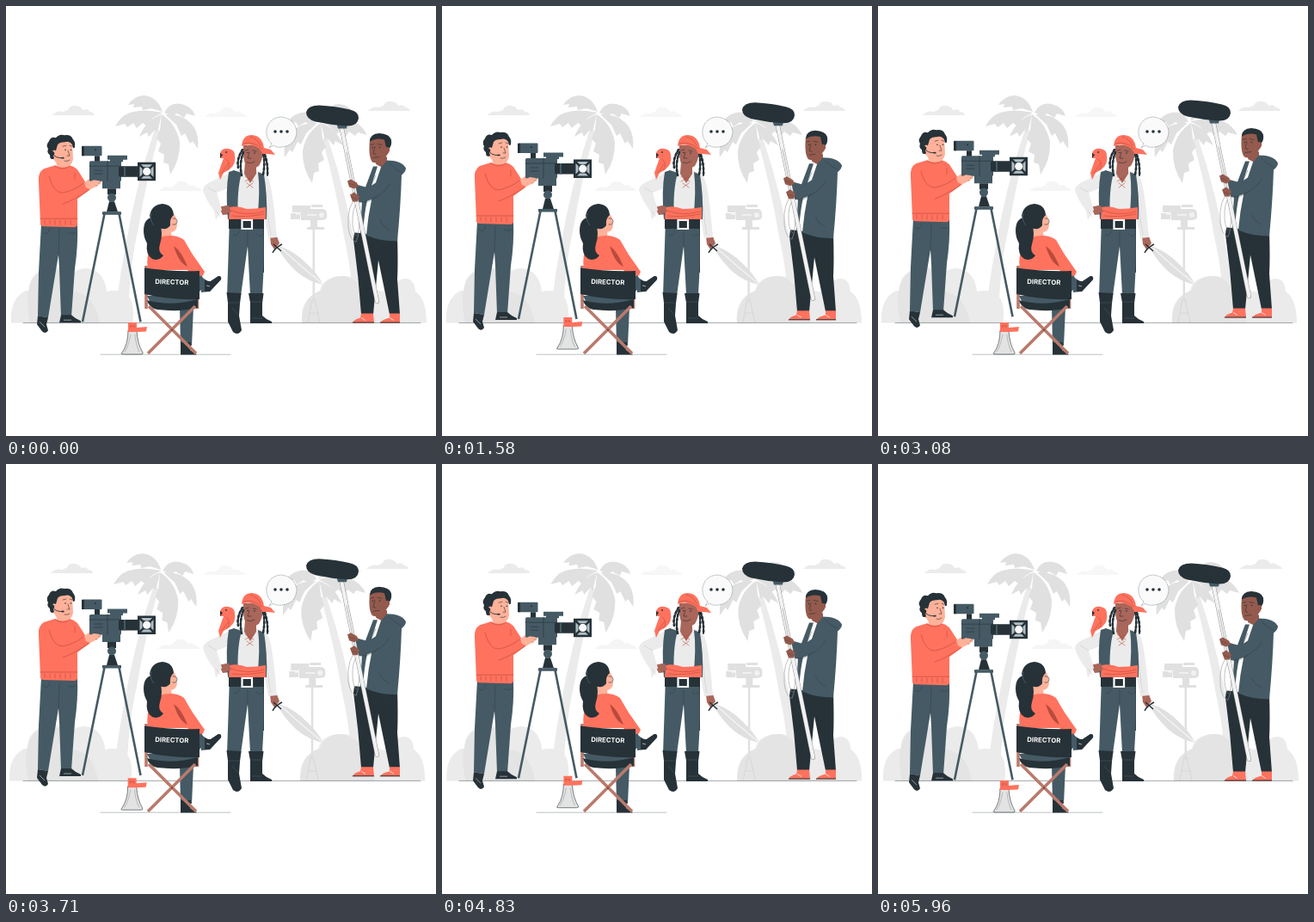
Recreate the animation shown at these times as an HTML page. Size 500 by 500 pixels, loop 6000 ms.

```html
<!DOCTYPE html>
<html lang="en">
<head>
<meta charset="utf-8">
<title>On set</title>
<style>
html, body { margin: 0; width: 100%; height: 100%; overflow: hidden; background: #fff; }
svg { display: block; width: 100vw; height: 100vh; }
.coral { fill: #ff725e; } .dark { fill: #263238; } .slate { fill: #455a64; }
.light { fill: #ffb199; } .tan { fill: #a9665a; } .brown { fill: #945a4d; }
.pale { fill: #ebebeb; } .grey { fill: #e0e0e0; } .white { fill: #fff; }
.ink { fill: none; stroke: #263238; stroke-width: .6; stroke-linecap: round; stroke-linejoin: round; }
.seam { fill: none; stroke: #b94b3c; stroke-width: .6; stroke-linecap: round; }
.fold { fill: none; stroke: #263238; stroke-width: .5; opacity: .7; }
.wood { fill: none; stroke: #b97a6c; stroke-width: 3.6; }
</style>
</head>
<body>
<svg viewBox="0 0 500 500">
  <defs>
    <path id="cloud" d="M0 12Q5 6 13 8Q16 6 18 6Q20 0 28 1Q34 2 35 6Q42 4 43 8Q48 8 49 12Z"/>
    <clipPath id="sky"><path d="M-10 0H510V368.5H-10Z"/></clipPath>
    <g id="palm">
      <path class="pale" d="M173 143Q150 212 138 285Q130 325 127 368H142Q143 305 154 258Q163 203 179 145Z"/>
      <g class="grey">
        <path d="M182 123Q176 105 160 104Q148 105 142 115L149 114L148 118L158 117L159 121L169 119Z"/>
        <path d="M182 124Q160 119 144 124Q133 128 127 140L138 137L141 141L148 136L152 142L159 136L163 139L171 130Z"/>
        <path d="M181 126Q163 132 155 152L164 147L166 152L173 144L176 147Z"/>
        <path d="M184 124Q190 111 204 114Q217 117 220 128L210 125L207 130L199 125L194 128Z"/>
        <path d="M185 126Q207 125 218 140Q225 151 223 166L217 157L214 160L208 148L204 151L198 138Z"/>
        <path d="M181 126Q198 137 202 158Q203 178 191 196L189 184L183 182L184 173L177 169L180 160L175 154L179 144Z"/>
      </g>
    </g>
  </defs>

  <g id="backdrop" clip-path="url(#sky)">
    <use href="#cloud" x="54" y="115" class="pale"/>
    <use href="#cloud" x="231" y="117" fill="#f7f7f7"/>
    <use href="#cloud" x="178" y="203" fill="#f5f5f5"/>
    <use href="#cloud" x="421" y="110" class="pale"/>
    <use href="#palm"/>
    <g transform="translate(547 10) scale(-1 1)"><use href="#palm"/></g>
    <path class="pale" d="M6 369Q4 340 23 331H27Q26 310 50 304Q66 302 76 311Q94 299 108 311Q116 319 117 332Q142 327 147 347Q149 358 147 369Z"/>
    <path class="grey" opacity=".6" d="M28 369Q21 335 30 319Q42 300 65 308Q78 315 77 332Q103 333 109 369Z"/>
    <path class="pale" d="M344 369Q341 341 365 331Q369 314 392 314Q410 314 417 328L450 334Q451 318 464 317Q475 317 476 332Q489 340 489 369Z"/>
    <path class="grey" opacity=".6" d="M344 369Q344 338 366 331Q373 314 392 314Q413 317 416 339Q430 347 430 369Z"/>
    <g class="grey">
      <path d="M333 232H354V237H342V240H333ZM342 236H369Q373 237 373 241V246Q372 249 366 249H343ZM331 241H342V248H331ZM355 231H368V234H355ZM354 249H362V257H354ZM350 257H370V260H350ZM356.5 260H359V345H356.5Z"/>
      <path d="M351 368L356 341H359L365 368M353 357H364" fill="none" stroke="#d7d7d7"/>
    </g>
    <path d="M337 242H342M350 243H361" fill="none" stroke="#fff"/>
    <circle cx="367" cy="243" r="3" fill="#f2f2f2"/>
  </g>

  <path class="ink" stroke-opacity=".7" d="M20 368.4H482"/>
  <path class="ink" stroke-opacity=".5" d="M110 405.2H261"/>

  <g id="cameraman">
    <path class="slate" d="M41 254H83Q84 280 80 306L76 362H64L62 306L61 290L49 363L37 361L38 310Z"/>
    <path class="fold" d="M62 260L61 291M43 264Q49 269 51 259M72 264Q78 267 82 263"/>
    <path class="dark" d="M37 361L49 363L47 371L49 378Q46 383 42 379L36 371ZM64 360H76Q80 364 87 367V369H62Z"/>
    <path d="M39 368L45 374M67 366H76" stroke="#fff" stroke-width=".5"/>
    <path class="light" d="M57 173L59 187Q64 194 74 188L73 178Z"/>
    <path class="coral" d="M57 186L44 190Q37 194 38 205L40 254Q40 257 44 257L80 258Q84 257 83 252V225L98 214L92 205L83 191Q79 187 74 186Q66 191 57 186Z"/>
    <path class="seam" d="M40 248H83M50 199Q55 218 66 218Q80 215 90 207M66 231Q78 227 96 215M57 187Q66 193 74 187M45 250V254M51 250V254M57 250V255M63 250V255M69 250V255M75 250V255M80 195V202"/>
    <path class="light" d="M91 206L98 201L110 202L111 206L106 210L98 214L93 212Z"/>
    <path class="ink" stroke-opacity=".5" d="M100 204L109 207M100 208L106 210"/>
    <path class="light" d="M54 160Q64 153 77 158L78 179Q76 188 69 188Q60 187 56 180Q50 176 54 168Z"/>
    <path class="dark" d="M56 178Q51 181 51 174Q47 171 49 167Q46 162 50 158Q52 152 58 154Q62 149 68 151Q76 150 78 156Q81 159 80 165Q78 168 77 162Q74 157 68 159Q62 159 60 162L58 169Q54 167 54 171Z"/>
    <path class="ink" d="M66 164L70 163M74 163L77 164M72 169L74 175L71 175M68 181Q71 182 74 180"/>
    <circle cx="69" cy="168" r=".8" class="dark"/><circle cx="75.5" cy="168" r=".8" class="dark"/>
    <path d="M54 172Q57 178 66 177.5" fill="none" stroke="#263238" stroke-width=".9"/>
    <circle cx="54" cy="172" r="2.3" class="dark"/><ellipse cx="66" cy="177.5" rx="1.8" ry=".9" class="dark"/>

    <path d="M115 240L89 368M131 240L156.5 368" fill="none" stroke="#455a64" stroke-width="2.6"/>
    <path class="slate" d="M112 203H133V213H112ZM112 240H134V243.5H112Z"/>
    <path class="dark" d="M118 213H128V220H118ZM120 228H126L130 240H117Z"/>
    <circle cx="123" cy="223.5" r="5" class="slate"/>
    <path class="dark" d="M103 175H109V182H103Z"/>
    <rect class="slate" x="88" y="163.5" width="23.5" height="11.5" rx="1"/>
    <path class="dark" d="M88 164H91V175H88Z"/>
    <circle cx="104" cy="168" r="1" class="dark"/>
    <path class="slate" d="M118 174.5H141V179.5H136V182H121V179.5H118Z"/>
    <rect class="slate" x="97" y="181" width="37" height="23.5" rx="1.5"/>
    <path class="ink" d="M97 187H133M118 181V204M103 192H112M103 196H112"/>
    <rect class="dark" x="131" y="187" width="24" height="12.5" rx="2"/>
    <path class="slate" d="M137 187H139V199.5H137Z"/>
    <path class="dark" d="M153 182.5H174V204H153Z"/>
    <path fill="#b0bec5" d="M157 185H170L167 188H160ZM157 201.5H170L167 198.5H160ZM155.5 187L158.5 190V196.5L155.5 199.5ZM171.5 187L168.5 190V196.5L171.5 199.5Z"/>
    <circle cx="163.7" cy="193.2" r="4.6" fill="#fafafa"/>
    <path class="light" d="M94 207L102 203L109 204L105 209L97 213Z"/>
  </g>

  <g id="megaphone">
    <path d="M142 378H152Q153 393 159 403Q160 405 157 405H136Q133 405 135 403Q142 393 142 378Z" class="ink" style="fill:#e3e3e3"/>
    <path class="coral" d="M142 368H152V374L164 373L163 378.5L152 379H142Z"/>
    <path class="seam" d="M144 372H149M145 374V372M149 374V372"/>
    <path class="ink" stroke-opacity=".4" d="M145 382Q143 394 138 402M150 382Q151 394 155 402"/>
  </g>

  <g id="director">
    <path class="light" d="M179 256L191 255L193 270H177Z"/>
    <path class="light" d="M185 238Q196 238 198 248L199 255Q198 264 189 263L184 256Z"/>
    <path class="coral" d="M178 269Q196 264 207 272Q211 279 217 289L231 309Q228 318 219 318L211 307H165Q162 288 171 275Z"/>
    <path d="M195 279Q204 285 211 303Q201 299 195 279Z" fill="#b94b3c"/>
    <path class="dark" d="M167 244Q169 231 182 230Q194 231 195 243Q190 247 191 255Q188 260 182 259Q176 259 172 254Z"/>
    <path class="dark" d="M173 245Q160 246 160 261Q160 269 164 276Q162 289 170 294Q178 297 183 290Q176 286 179 277Q183 265 179 254Z"/>
    <path d="M169 241Q166 248 172 255" fill="none" stroke="#455a64"/>
    <path class="ink" d="M194 247Q199 246 199 251Q198 255 194 254"/>
    <path class="slate" d="M202 350H218L216 395H203Z"/>
    <path class="dark" d="M203 391H215L214 400Q219 403 222 405.5H203Z"/>
    <path class="slate" d="M207 315L228 314L230 327L220 337H208Z"/>
    <path class="slate" d="M226 313Q233 321 238 320L247 314Q251 314 250 318L237 332L227 333Z"/>
    <path class="dark" d="M231 318Q235 321 238 320L247 314Q251 314 250 318L237 332L231 332Z"/>
    <path d="M233 325L237 326" stroke="#fff" stroke-width=".6"/>
    <path d="M163 302V352M222.5 314V352" class="wood"/>
    <path class="slate" d="M164 337H222V349Q216 354 194 354Q170 353 164 337Z"/>
    <path class="dark" d="M164 342Q192 350 223 341V351Q202 356 176 353Q166 351 164 342Z"/>
    <path d="M220 349L165 404M166 349L221 404" class="wood"/>
    <path class="dark" d="M161 304.5Q191 309 225 308L225 341Q190 342 161 335Z"/>
    <circle cx="193" cy="376.5" r="1.2" fill="#7a473d"/>
    <text x="192.8" y="323.6" transform="rotate(2 192 322)" text-anchor="middle" fill="#fff" font-family="Inter, Lato, sans-serif" font-size="7.7" font-weight="700">DIRECTOR</text>
  </g>

  <g id="pirate">
    <path d="M318 279Q335 285 349 299Q362 311 369 324Q352 321 338 309Q327 299 318 285Z" class="grey"/>
    <path d="M319 281Q342 302 368 323" fill="none" stroke="#f5f5f5" stroke-width="1.2"/>
    <path class="dark" d="M296 250H300V310H296Z"/>
    <path class="slate" d="M260 247H299Q301 292 298 336H284L281 279L273 337H257Z"/>
    <path class="fold" d="M281 262V281M264 265Q269 270 271 261M291 265Q295 270 299 265"/>
    <path class="dark" d="M256.5 333L273.5 334L272 346L271 360L274 377Q270 384 264 379L258 367L258 345ZM282 334H299.5L298 346V360Q303 365 309 367V369H284V345Z"/>
    <path fill="none" stroke="#455a64" stroke-width=".6" d="M258 345H272M284 344H298M263 351L270 359M286 363H298"/>
    <path class="tan" d="M248 235L256 232L264 235L261 242L252 243ZM307 268H315L318 276L312 283L308 277Z"/>
    <path d="M310 287Q313 281 321 277M311 277L320 285" fill="none" stroke="#263238" stroke-width="1.5"/>
    <path class="pale" d="M264 192Q281 188 298 193Q306 198 308 210Q312 232 315 269L305 270L300 244H263L258 212L245 217L251 237L244 249L242 238Q232 225 229 214Q229 210 235 206Z"/>
    <path d="M235 211L245 217M244 238L249 245M301 209Q303 240 308 266" fill="none" stroke="#cfcfcf" stroke-width=".7"/>
    <path class="tan" d="M278 180H291V195L284 206L277 195Z"/>
    <path class="slate" d="M265 191L274 194Q268 215 270 248H258Q255 216 259 193ZM293 193L300 196Q304 220 303 248H292Q296 216 293 193Z"/>
    <path class="seam" d="M278 198L288 204M288 198L278 204M280 206L287 211M287 206L280 211"/>
    <path class="coral" d="M260 234Q270 232 280 236Q291 236 302 234V248Q280 251 259 248Z"/>
    <path class="seam" d="M262 238Q280 245 300 239M263 244Q279 246 300 242"/>
    <path class="dark" d="M259 248H300V259H259Z"/>
    <path d="M274.5 249H286V259H274.5Z" fill="#263238" stroke="#fff" stroke-width="2.2"/>
    <path class="tan" d="M250 233L259 232L262 239L254 242Z"/>
    <path class="tan" d="M276 162L298 162Q300 177 294 186Q287 191 279 185Q275 178 276 162Z"/>
    <g fill="none" stroke="#263238" stroke-linecap="round">
      <path stroke-width="2.6" stroke-dasharray="2 3.2" d="M275 167Q268 178 270 188M276 170Q271 183 274 197M298 168Q302 181 299 196M299 168Q305 181 304 197"/>
      <path stroke-width="1.8" d="M275 167Q268 178 270 188M276 170Q271 183 274 197M298 168Q302 181 299 196M299 168Q305 181 304 197"/>
    </g>
    <path class="coral" d="M274 163Q275 150 286 150Q298 151 300 165L308 167L313 173L304 172L298 172L295 166Q284 159 274 163Z"/>
    <path class="seam" d="M276 160Q286 156 298 166M284 152Q292 154 296 162"/>
    <path class="ink" d="M278 168L282 167M287 168L291 169M283 170L281 177L285 177M280 182Q285 184 289 181"/>
    <circle cx="281" cy="170.5" r=".8" class="dark"/><circle cx="289" cy="171" r=".8" class="dark"/>
    <path class="coral" d="M249 171Q251 165 259 166Q266 167 266 174Q268 183 260 190L253 194L249 202L247 194Q250 185 253 177L249 177Z"/>
    <path class="seam" d="M256 178Q263 184 257 191M251 194L258 184"/>
    <circle cx="256" cy="170" r=".9" class="dark"/><path class="dark" d="M249 171L252 173L249 177Z"/>
  </g>

  <path d="M309 160Q302 154 303 144Q306 130 320 129Q336 131 338 146Q337 162 321 164Q315 165 311 162L306 165Z" fill="#fafafa" stroke="#455a64" stroke-width=".5" stroke-dasharray="1.2 .6"/>
  <path d="M313 146H313.01M320 146H320.01M327 146H327.01" fill="none" stroke="#263238" stroke-width="3.6" stroke-linecap="round"/>

  <g id="boom">
    <path class="dark" d="M405 264L455 268Q456 300 455 318L458 359H446L433 296L427 359H413Q410 315 404 272Z"/>
    <path class="coral" d="M413 358H427L428 369H403Q404 365 412 363ZM446 358H458V369H435Q437 365 446 363Z"/>
    <path d="M403 368.5H428M435 368.5H458" stroke="#263238"/>
    <path d="M413 363L418 366M446 363L451 366" stroke="#fff" stroke-width=".7"/>
    <path class="brown" d="M429 173L443 176V188L431 191Z"/>
    <path class="white" d="M429 184L437 188L422 266L413 265Q418 214 425 191Z"/>
    <path class="slate" d="M443 180Q460 180 465 189Q465 193 460 197Q459 232 455 274Q434 274 419 267Q423 222 436 188ZM427 187L418 211L407 208L403 220Q408 228 414 227L412 265L415 266Q417 232 424 212L432 187Z"/>
    <path class="fold" d="M445 183Q453 191 460 194M430 197Q424 213 418 217M443 205Q437 222 417 230M434 249Q438 257 446 261"/>
    <path class="slate" d="M441 197L446 208Q438 222 414 229Q407 230 403 221L407 208L418 213Q429 208 441 197Z"/>
    <path class="fold" d="M446 208Q438 222 414 229"/>
    <path d="M409 221Q396 232 398 258Q400 273 407 275Q413 263 409 227Q402 236 403 254Q404 265 408 268" fill="none" stroke="#999" stroke-width=".6"/>
    <path d="M390 141L431.5 344" stroke="#8a8a8a" stroke-width="5" stroke-linecap="round"/>
    <path d="M390 141L431.5 344" stroke="#f2f2f2" stroke-width="4.1" stroke-linecap="round"/>
    <path d="M396 170L407 224" stroke="#999" stroke-width=".6"/>
    <path class="slate" d="M384 136L397 138L396 143H386Z"/>
    <path class="dark" d="M349 124Q351 116 364 116Q384 117 400 121Q410 123 410 131Q409 140 397 140Q378 139 360 135Q349 132 349 124Z"/>
    <path class="brown" d="M397 204L401 202L408 206L410 210L405 213L399 211ZM400 220L405 217L411 222L409 228L403 228Z"/>
    <path class="ink" stroke-opacity=".5" d="M399 207L405 209M402 223L408 225"/>
    <path class="brown" d="M423 156L443 153Q447 164 445 171L440 178Q434 185 426 182Q421 176 423 156Z"/>
    <path class="dark" d="M423 158Q423 149 434 148.5Q446 149 448 156Q449 163 445 167L442 165L440 156Q431 153 423 158Z"/>
    <path class="ink" d="M424 162L428 161M432 161L437 162M429 164L427 172L430 173M427 177L434 176"/>
    <circle cx="426.5" cy="165" r=".8" class="dark"/><circle cx="434.5" cy="165" r=".8" class="dark"/>
    <path class="brown" d="M441 165Q447 163 446 169Q444 173 441 171Z"/>
  </g>
</svg>
<script>
const LOOP = 6000;
const part = id => document.getElementById(id);
const move = (id, x, y) => part(id).setAttribute("transform", `translate(${x.toFixed(2)} ${y.toFixed(2)})`);
// Eased swing from 0 to 1 and back, once per period.
const swing = (time, period) => (1 - Math.cos(2 * Math.PI * time / period)) / 2;

function draw(time) {
  const slow = swing(time, LOOP);
  const fast = swing(time, LOOP / 2);
  move("backdrop", -2 * slow, 0);
  move("cameraman", 0, -0.8 - 6 * slow);
  move("boom", 0, -0.5 - 6 * slow);
  move("megaphone", -0.7 * fast, -6 * fast);
}

const start = performance.now();
function tick() {
  draw((performance.now() - start) % LOOP);
  requestAnimationFrame(tick);
}
tick();
</script>
</body>
</html>
```
